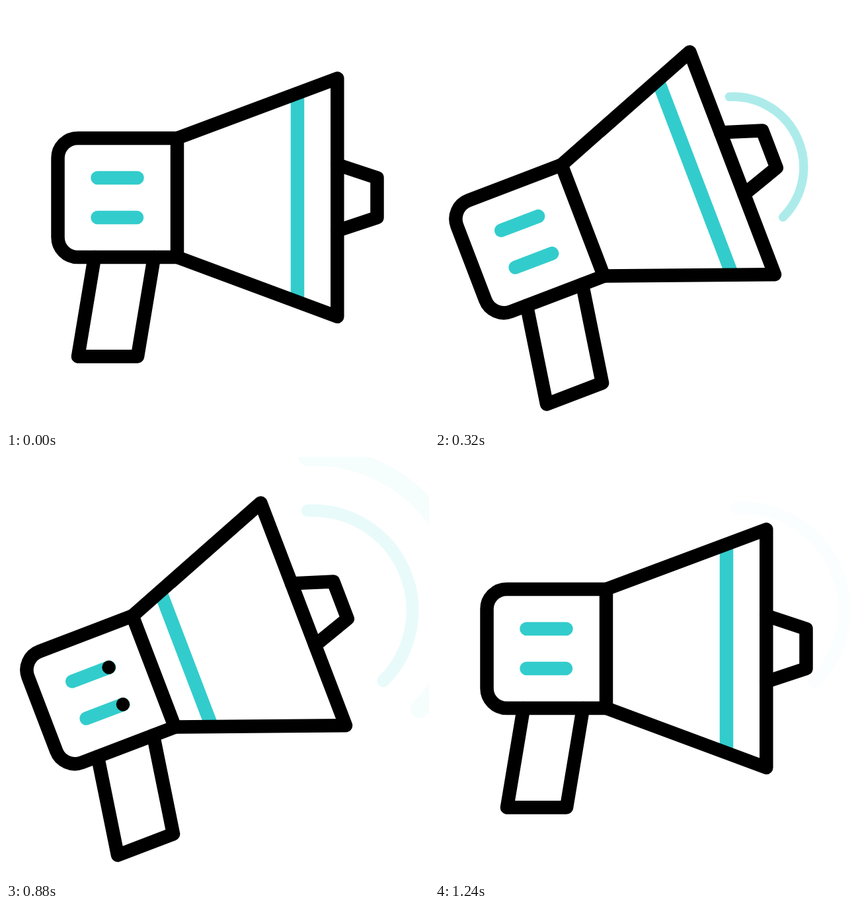
These frames come from a looping animation (640 by 640 pixels, 1480 ms). An HTML page:

```html
<!DOCTYPE html>
<html lang="en">
<head>
<meta charset="utf-8">
<title>Megaphone</title>
<style>
  html, body { margin: 0; width: 100%; height: 100%; overflow: hidden; background: #fff; }
  svg { display: block; width: 100%; height: 100%; }
  path { fill: none; stroke-linecap: round; stroke-linejoin: round; }
  .ink { stroke: #000; stroke-width: 20.5; }
  .teal { stroke: #33cccc; stroke-width: 20.5; }
  #stripe { stroke-linecap: butt; }
</style>
</head>
<body>
<svg viewBox="0 0 640 640">
  <path class="teal" id="near"/>
  <path class="teal" id="far"/>
  <g id="horn">
    <path class="teal" id="stripe"/>
    <path class="teal" d="M138.5 260H198.5M138.5 320H198"/>
    <path class="ink" id="dashes"/>
    <path class="ink" d="M259 200H108.500A30 30 0 0 0 78.500 230V350A30 30 0 0 0 108.500 380H259Z"/>
    <path class="ink" d="M259 200L501.300 109.500V470L259 380"/>
    <path class="ink" d="M134 380L109 530.300H199L224 380"/>
    <path class="ink" d="M501.300 240L561.500 260V320L501.300 340"/>
  </g>
</svg>
<script>
const LOOP = 1480, STEP = 40;
const UP = [80, 320], DOWN = [880, 1240];   // the horn swings up, later back
const TILT = 20.9, PIVOT = '334.8 403.7';
const DASH = 59.3;

const near = { id: 'near', x: 450.5, y: 244.5, dx: 14.5, dy: -13.4, size: 1, from: 240, alpha: 0.4, rest: 0.02 };
const far = { id: 'far', x: 466.5, y: 232, dx: 1.6, dy: -9.6, size: 1.48, from: 360, alpha: 0.2, rest: 0 };

const el = id => document.getElementById(id);
const progress = (t, from, to) => Math.min(1, Math.max(0, (t - from) / (to - from)));
const ease = (t, from, to) => {
  const p = progress(t, from, to);
  return p * p * (3 - 2 * p);
};
// Rises from 0 to 1 and falls back; a skew below 1 peaks earlier
const bump = (t, [from, to], skew = 1) =>
  Math.sin(Math.PI * progress(t, from, to) ** skew) ** 2;

function offset(t) {
  const dip = bump(t, UP, 0.85);
  const swinging = t > UP[1] && t < DOWN[0];
  const shake = swinging ? Math.sin((t - UP[1]) / 160 * 2 * Math.PI) : 0;
  return [
    2.6 * shake - dip - 17.5 * bump(t, DOWN, 0.45),
    3 * shake + 49 * dip + 43 * bump(t, DOWN)
  ];
}

function drawWave(wave, t) {
  const grow = ease(t, 240, 1000);
  const r = wave.size * (105.3 + 49 * grow);
  const x = wave.x + wave.dx * grow, y = wave.y + wave.dy * grow;
  const at = deg => {
    const a = deg * Math.PI / 180;
    return `${x + r * Math.cos(a)} ${y + r * Math.sin(a)}`;
  };
  const fade = wave.alpha + (wave.rest - wave.alpha) * ease(t, 520, 1040);
  const path = el(wave.id);
  path.setAttribute('d', `M${at(-93)}A${r} ${r} 0 0 1 ${at(45)}`);
  path.style.strokeWidth = r * 0.125;
  path.setAttribute('opacity', fade * ease(t, wave.from, wave.from + 80));
}

function draw(t) {
  const angle = TILT * (ease(t, ...UP) - ease(t, ...DOWN));
  el('horn').setAttribute('transform', `translate(${offset(t).join(' ')}) rotate(${-angle} ${PIVOT})`);

  const x = 441 - 129.5 * (ease(t, 320, 520) - ease(t, 880, 1160));
  const spread = (x - 259) * 0.373;
  el('stripe').setAttribute('d', `M${x} ${200 - spread}V${380 + spread}`);

  const x1 = 138.5 + DASH * ease(t, 520, 880);
  const x2 = 138.5 + DASH * ease(t, 320, 680) + 0.01;
  const shown = t > 320 && t <= 880;
  el('dashes').setAttribute('d', shown ? `M${x1} 260H${x2}M${x1} 320H${x2}` : '');

  drawWave(near, t);
  drawWave(far, t);
}

const start = performance.now();
function tick() {
  const t = (performance.now() - start) % LOOP;
  draw(Math.floor(t / STEP + 0.01) * STEP % LOOP);
  requestAnimationFrame(tick);
}
tick();
</script>
</body>
</html>
```
